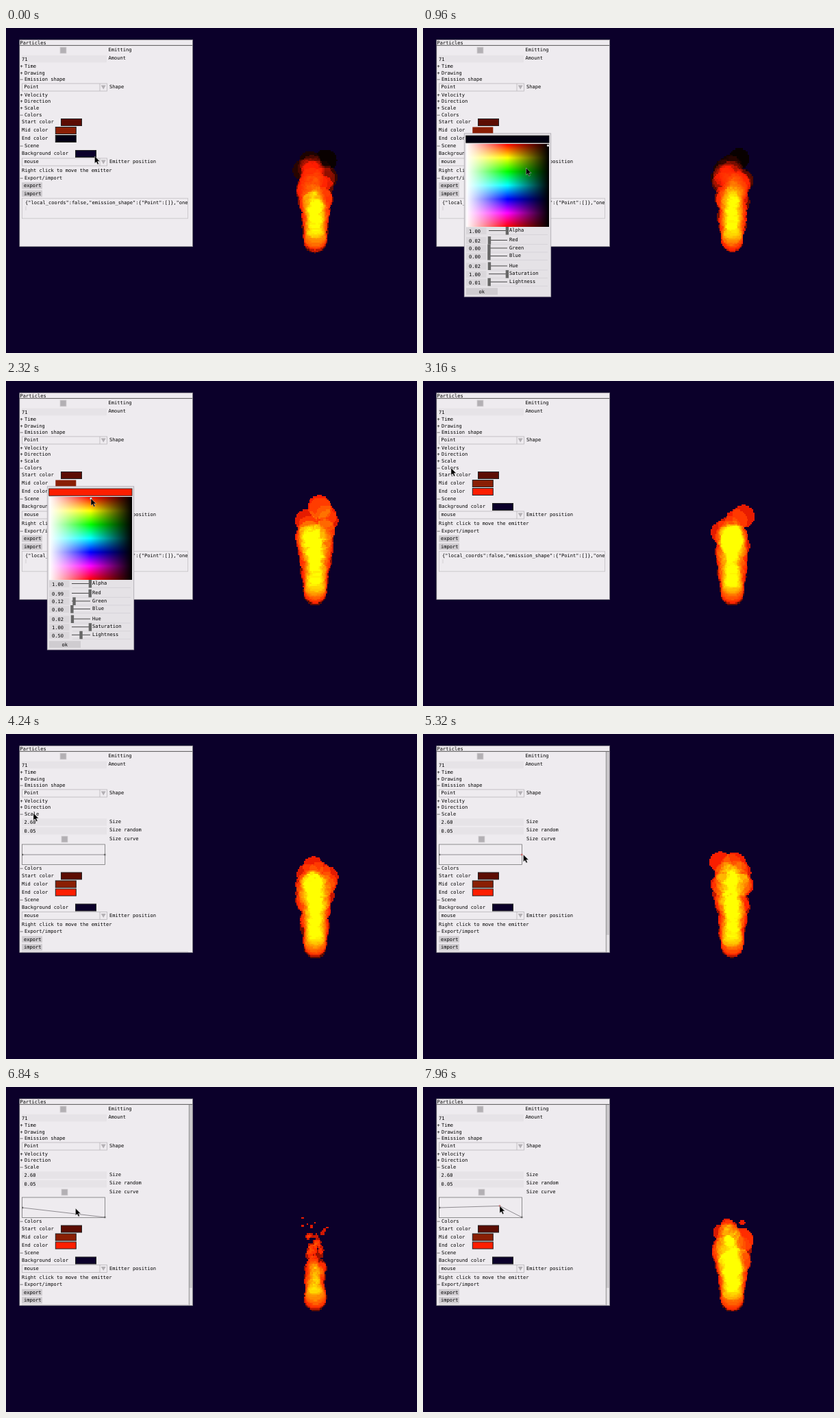
Animation, 600 px wide and 474 px high, one loop 8000 ms. Source, as an HTML page with a canvas:

```html
<!DOCTYPE html>
<html lang="en">
<head>
<meta charset="utf-8">
<title>Particle editor</title>
<style>
html, body { margin: 0; width: 100%; height: 100%; overflow: hidden; background: #0b002a; }
canvas, svg { position: absolute; left: 0; top: 0; width: 100%; height: 100%; display: block; }
canvas { image-rendering: pixelated; }
text { font: 7.05px "DejaVu Sans Mono", monospace; fill: #000; white-space: pre; }
</style>
</head>
<body>
<canvas id="fire" width="320" height="200"></canvas>
<svg id="ui" viewBox="0 0 600 474" preserveAspectRatio="none"></svg>
<script>
const LOOP = 8000, STEP = 40, LIFE = 1000, AMOUNT = 71;
const PICK_OPEN = 520, PICK_DRAG = 1300, PICK_DONE = 2340, PICK_CLOSE = 2520;
const SCALE_OPEN = 4200, BAR_SHOWN = 4280;
const START = [94, 12, 0], MID = [138, 15, 0];

const ui = document.getElementById('ui');
const ctx = document.getElementById('fire').getContext('2d');

// SVG helpers
function el(parent, tag, attrs, content) {
  const node = document.createElementNS('http://www.w3.org/2000/svg', tag);
  set(node, attrs);
  if (content !== undefined) node.textContent = content;
  return parent.appendChild(node);
}
function set(node, attrs) {
  for (const k in attrs) node.setAttribute(k, attrs[k]);
}
function show(node, on) { set(node, { display: on ? 'inline' : 'none' }); }
const group = (p, attrs = {}) => el(p, 'g', attrs);
const text = (p, x, y, s) => el(p, 'text', { x, y }, s);
const rect = (p, x, y, width, height, fill, stroke = 'none', w = 0.8) =>
  el(p, 'rect', { x, y, width, height, fill, stroke, 'stroke-width': w });
const line = (p, x1, y1, x2, y2, stroke, w = 0.8) =>
  el(p, 'line', { x1, y1, x2, y2, stroke, 'stroke-width': w });

// Widgets
const foldMark = open => open ? '–' : '+';
function fold(p, y, label, open) {
  const mark = text(p, 20.5, y, foldMark(open));
  text(p, 27, y, label);
  return mark;
}
function field(p, x, y, value, label, labelX) {
  rect(p, 23, y, 124, 10.5, '#e6e3e7');
  text(p, x, y + 8, value);
  text(p, labelX, y + 6.3, label);
}
function check(p, x, y, label, labelX) {
  rect(p, x, y, 9, 9, '#b3b0b4', '#d2cfd3');
  text(p, labelX, y + 6.2, label);
}
function combo(p, y, value, label) {
  rect(p, 23.5, y, 124, 11, 'none', '#b9b6ba');
  line(p, 137, y, 137, y + 11, '#b9b6ba');
  el(p, 'path', { d: `M138.7 ${y + 2.5}h7l-3.5 6z`, fill: '#b3b0b4' });
  text(p, 26.5, y + 7.3, value);
  text(p, 151, y + 7.3, label);
}
function swatch(p, x, y, label, fill) {
  text(p, 23, y + 6.8, label);
  return rect(p, x, y, 30, 10, fill, '#222', 1);
}
function button(p, y, width, x, label) {
  rect(p, 23, y, width, 9.5, '#cfccd0');
  text(p, x, y + 7.2, label);
}

// Main panel
const defs = el(ui, 'defs', {});
const clips = { panel: [20, 17, 252.5, 302], json: [24, 248, 241, 30], curve: [23, 160, 123, 32] };
for (const id in clips) rect(el(defs, 'clipPath', { id }), ...clips[id], '#000');

const panel = group(ui, { 'clip-path': 'url(#panel)' });
rect(panel, 20, 17, 252.5, 302, '#eeebef');
text(panel, 20.5, 24, 'Particles');
line(panel, 20, 25.4, 272.5, 25.4, '#333');
check(panel, 79, 28, 'Emitting', 149.5);
field(panel, 23, 39.8, '71', 'Amount', 149.5);
fold(panel, 58, 'Time');
fold(panel, 67.7, 'Drawing');
fold(panel, 77.2, 'Emission shape', true);
combo(panel, 81, 'Point', 'Shape');
fold(panel, 99.7, 'Velocity');
fold(panel, 109.2, 'Direction');
const scaleMark = fold(panel, 119, 'Scale');

const scale = group(panel);
field(scale, 26.5, 123.3, '2.60', 'Size', 151);
field(scale, 26.5, 136, '0.05', 'Size random', 151);
check(scale, 81, 149, 'Size curve', 151);
rect(scale, 23.5, 161, 121, 29.5, 'none', '#777');
const curve = group(scale, { 'clip-path': 'url(#curve)' });
const curveLine = el(curve, 'polyline', { fill: 'none', stroke: '#858287', 'stroke-width': 0.9 });
const dots = [0, 1, 2].map(() => rect(curve, 0, 0, 2.4, 2.4, '#666'));

const rest = group(panel);
fold(rest, 128.7, 'Colors', true);
swatch(rest, 80.5, 132.5, 'Start color', '#5c0d03');
const midSwatch = swatch(rest, 72.3, 144.5, 'Mid color', '#8a1f05');
const endSwatch = swatch(rest, 72.3, 156.5, 'End color', '#050010');
fold(rest, 174.3, 'Scene', true);
swatch(rest, 101.5, 178.5, 'Background color', '#0b002a');
combo(rest, 190, 'mouse', 'Emitter position');
text(rest, 23, 210, 'Right click to move the emitter');
fold(rest, 220.7, 'Export/import', true);
button(rest, 225.2, 30, 26, 'export');
button(rest, 236.7, 30, 26, 'import');
rect(rest, 23.5, 248.3, 242, 29.5, 'none', '#c4c1c5');
text(group(rest, { 'clip-path': 'url(#json)' }), 28, 256.7,
  '{"local_coords":false,"emission_shape":{"Point":[]},"one_shot":false');
line(rest, 29, 260, 29, 266, '#cbc8cc');

const bar = group(panel);
rect(bar, 267.5, 26, 5, 293, '#e3e0e4');
rect(bar, 267.5, 26, 5, 267, '#c9c6ca');
line(bar, 267.3, 26, 267.3, 319, '#777', 0.8);
rect(ui, 19.8, 17.3, 252.8, 301.4, 'none', '#8a878e', 0.8);

// Color picker
function gradient(id, vertical, stops) {
  const g = el(defs, 'linearGradient', vertical ? { id, x2: 0, y2: 1 } : { id });
  stops.forEach(([color, opacity], i) =>
    el(g, 'stop', { offset: i / (stops.length - 1), 'stop-color': color, 'stop-opacity': opacity }));
}
gradient('hue', true, ['#f00', '#ff0', '#0f0', '#0ff', '#00f', '#f0f', '#f00'].map(c => [c, 1]));
gradient('tint', false, [['#fff', 1], ['#fff', 0]]);
gradient('shade', false, [['#000', 0], ['#000', 1]]);

const picker = group(ui);
rect(picker, 60.3, 153.8, 126.4, 238.2, '#e5e2e6', '#a9a6ad');
const chosen = rect(picker, 62.7, 157, 121.3, 10.3, '#050000', '#222');
rect(picker, 63, 169, 121, 121, 'url(#hue)');
rect(picker, 63, 169, 60.5, 121, 'url(#tint)');
rect(picker, 123.5, 169, 60.5, 121, 'url(#shade)');
const spot = el(picker, 'circle', { r: 1.6, fill: '#fff', stroke: '#555', 'stroke-width': 0.5 });
const sliders = [
  ['Alpha', 295.5], ['Red', 309.5], ['Green', 321], ['Blue', 332.5],
  ['Hue', 347], ['Saturation', 358.7], ['Lightness', 370.3]
].map(([label, y]) => {
  rect(picker, 63, y - 4.5, 29.5, 10, '#dad7db');
  line(picker, 96, y, 123, y, '#222');
  line(picker, 97, y + 6, 182, y + 6, '#cfccd0', 0.6);
  text(picker, 126, y + 1.7, label);
  return { value: text(picker, 67, y + 3.3, ''), knob: rect(picker, 0, y - 5.5, 4.4, 11.5, '#666') };
});
rect(picker, 63, 379.2, 46, 10, '#cfccd0');
text(picker, 81.5, 386.7, 'ok');

const cursor = el(ui, 'path', {
  d: 'M0 0V10.3L2.4 8.2L4.2 12L5.9 11.2L4.2 7.5H7.5Z',
  fill: '#000', stroke: '#ddd', 'stroke-width': 0.45
});

// Motion
const path = [
  [0, 129.5, 187], [80, 129.5, 187], [400, 90, 161], [520, 90, 161], [960, 150.5, 204],
  [1300, 135, 184], [1700, 126, 173], [2200, 124, 171.4], [2340, 124, 171.4],
  [2500, 86, 380], [2600, 70, 290], [3040, 41, 127], [3400, 41, 127], [3840, 40, 115.5],
  [4320, 40, 115.5], [5000, 146.5, 176], [5500, 146.5, 176], [6240, 144.5, 190],
  [6340, 144.5, 190], [6800, 101.5, 177], [6860, 101.5, 177], [7000, 103, 182],
  [7900, 112, 173.5], [8000, 112, 173.5]
];
const clamp = v => Math.min(1, Math.max(0, v));
const mix = (a, b, k) => a + (b - a) * k;
const rand = n => { const v = Math.sin(n * 127.1 + 3.7) * 43758.5453; return v - Math.floor(v); };

function cursorAt(t) {
  const i = Math.max(1, path.findIndex(p => p[0] > t));
  const [t0, x0, y0] = path[i - 1], [t1, x1, y1] = path[i];
  const k = clamp((t - t0) / (t1 - t0)), e = k * k * (3 - 2 * k);
  return [mix(x0, x1, e), mix(y0, y1, e)];
}
function endColor(t) {
  if (t < PICK_DRAG) return { h: 0.02, l: 0.01 };
  const [x, y] = cursorAt(Math.min(t, PICK_DONE));
  return { h: clamp((y - 169) / 121), l: clamp(1 - (x - 63) / 121) };
}
function toRgb({ h, l }) {
  const a = Math.min(l, 1 - l);
  return [0, 8, 4].map(n => {
    const k = (n + h * 12) % 12;
    return l - a * Math.max(-1, Math.min(k - 3, 9 - k, 1));
  });
}
function curveAt(t) {
  const end = t < 5500 ? 176 : cursorAt(Math.min(t, 6300))[1];
  const points = [[24, 176], [144.3, Math.min(end, 190)]];
  if (t >= 7000) points.splice(1, 0, cursorAt(t));
  return points;
}
function sizeAt(points, u) {
  const x = mix(24, 144.3, u);
  const i = Math.max(1, points.findIndex(p => p[0] >= x));
  const [x0, y0] = points[i - 1], [x1, y1] = points[i];
  return Math.max(0, (190 - mix(y0, y1, (x - x0) / (x1 - x0))) / 14);
}

// Discs add up on a coarse grid, so overlaps turn from red to yellow
function disc(x, y, r) {
  const w = 600 / 320, h = 474 / 200;
  for (let j = Math.floor((y - r) / h); j <= (y + r) / h; j++) {
    const dy = (j + 0.5) * h - y;
    if (Math.abs(dy) >= r) continue;
    const half = Math.sqrt(r * r - dy * dy);
    const left = Math.round((x - half) / w);
    ctx.fillRect(left, j, Math.round((x + half) / w) - left, 1);
  }
}
function drawFire(t, end, points) {
  ctx.globalCompositeOperation = 'source-over';
  ctx.clearRect(0, 0, 320, 200);
  ctx.globalCompositeOperation = 'lighter';
  for (let i = 0; i < AMOUNT; i++) {
    const s = t / LIFE + i / AMOUNT;
    const u = s % 1, seed = i + AMOUNT * (Math.floor(s) % (LOOP / LIFE));
    const dist = 132 * u * (0.66 + 0.34 * rand(seed));
    const angle = 0.35 * (rand(seed + 1000) - 0.5);
    const r = 16 * (0.93 + 0.14 * rand(seed + 2000)) * sizeAt(points, u);
    const color = START.map((c, n) =>
      Math.round(u < 0.5 ? mix(c, MID[n], u * 2) : mix(MID[n], end[n] * 255, u * 2 - 1)));
    ctx.fillStyle = `rgb(${color})`;
    disc(451.3 + dist * Math.sin(angle), 311.5 - dist * Math.cos(angle), r);
  }
}

function render(t) {
  const hl = endColor(t), rgb = toRgb(hl), points = curveAt(t);
  const css = `rgb(${rgb.map(v => Math.round(v * 255))})`;
  drawFire(t, rgb, points);

  const open = t >= SCALE_OPEN, picking = t >= PICK_OPEN && t < PICK_CLOSE;
  scaleMark.textContent = foldMark(open);
  show(scale, open);
  show(bar, t >= BAR_SHOWN);
  set(rest, { transform: `translate(0 ${open ? 69.5 : 0})` });
  set(midSwatch, { stroke: picking ? 'none' : '#222' });
  set(endSwatch, { fill: t < PICK_DRAG ? '#030014' : css });

  set(curveLine, { points: points.join(' ') });
  const [mx, my] = cursorAt(t);
  dots.forEach((dot, i) => {
    show(dot, i < points.length);
    if (i >= points.length) return;
    const [x, y] = points[i], near = Math.hypot(x - mx, y - my) < 4;
    set(dot, { x: x - 1.2, y: y - 1.2, fill: near ? '#c66' : '#666' });
  });

  show(picker, picking);
  set(chosen, { fill: t < PICK_DRAG ? '#020010' : css });
  set(spot, { cx: Math.min(182.5, 63 + 121 * (1 - hl.l)), cy: 169 + 121 * hl.h });
  [1, ...rgb, hl.h, 1, hl.l].forEach((v, i) => {
    sliders[i].value.textContent = v.toFixed(2);
    set(sliders[i].knob, { x: 94.2 + 26.5 * v });
  });
  set(cursor, { transform: `translate(${mx} ${my})` });
}

const began = performance.now();
function tick() {
  const t = (performance.now() - began) % LOOP;
  render(Math.floor(t / STEP) * STEP);
  requestAnimationFrame(tick);
}
tick();
</script>
</body>
</html>
```
